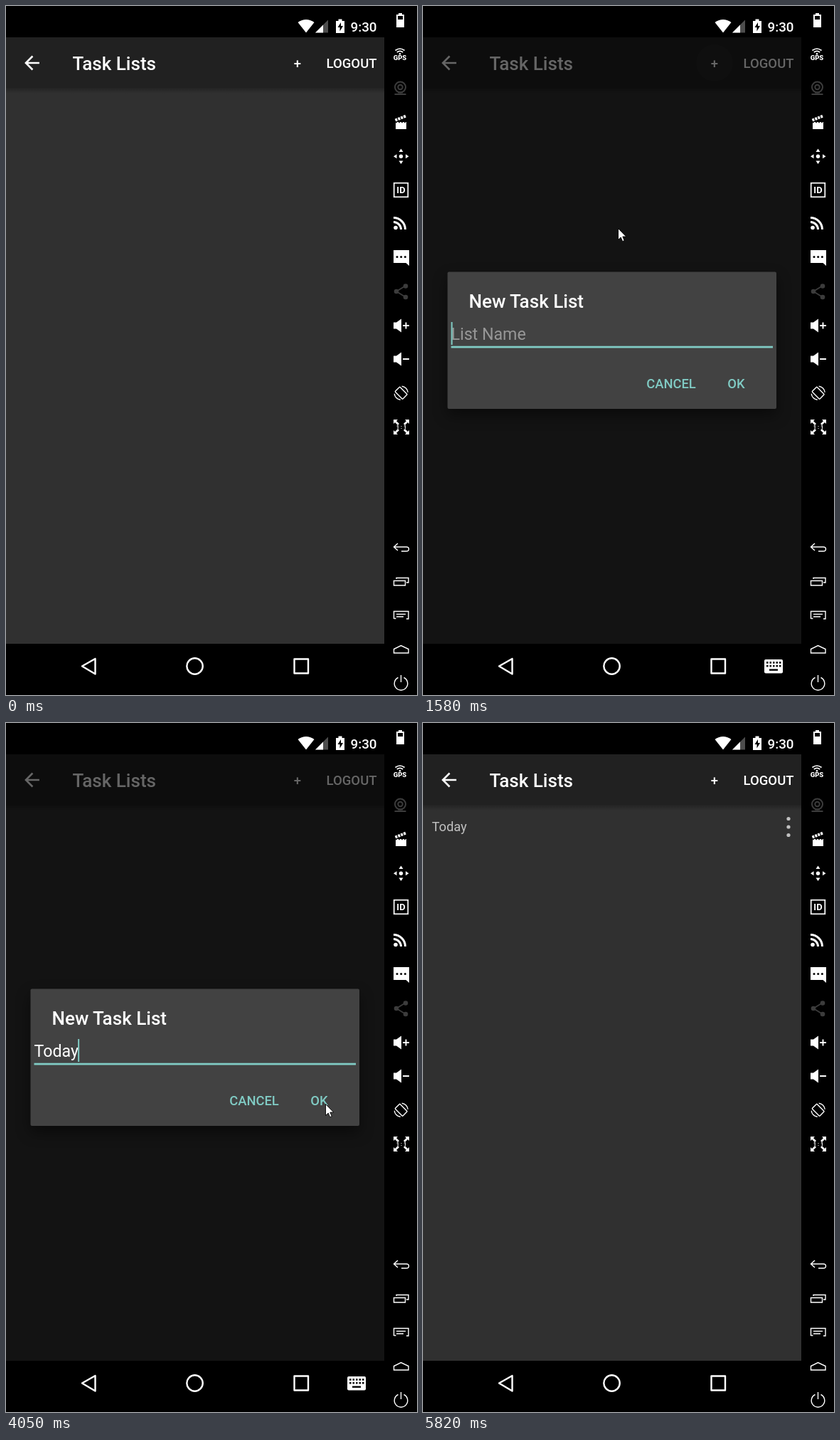
Write an HTML page that moves like this. It is 578 px wide and 968 px high and loops after 7.11 s.

```html
<!DOCTYPE html>
<html lang="en">
<head>
<meta charset="utf-8">
<title>Task Lists</title>
<style>
  html, body { margin: 0; width: 100%; height: 100%; overflow: hidden; background: #000; }
  svg { display: block; }
  text { font: 500 18.4px Roboto, sans-serif; fill: #fff; white-space: pre; }
  .title { font-size: 26px; }
  .mid { text-anchor: middle; }
  .line { fill: none; stroke: #fff; }
  .teal { fill: #80cbc4; }
  #field { font-size: 23.2px; font-weight: 400; }
  #panel { fill: #424242; filter: drop-shadow(0 9px 10px rgba(0, 0, 0, .45)); }
</style>
</head>
<body>
<svg width="578" height="968" fill="#fff">
  <defs>
    <linearGradient id="fade" x2="0" y2="1">
      <stop stop-opacity=".26"/><stop offset="1" stop-opacity="0"/>
    </linearGradient>
    <path id="speaker" d="M545 -5h4l7 -5v19l-7 -5h-4z"/>
    <path id="corner" d="M0 0h6l-2 2 4 4-2 2-4-4-2 2z"/>
    <clipPath id="screen"><path d="M0 44h532v852H0z"/></clipPath>
  </defs>
  <rect width="578" height="968" fill="#000"/>

  <!-- app -->
  <g clip-path="url(#screen)">
    <rect y="44" width="532" height="852" fill="#303030"/>
    <rect y="44" width="532" height="71" fill="#212121"/>
    <rect y="115" width="532" height="8" fill="url(#fade)"/>
    <circle id="ripple" cx="410" cy="80" r="25.7"/>
    <path transform="translate(20.9 64.4) scale(1.3)" d="M20 11H7.83l5.59-5.59L12 4l-8 8 8 8 1.41-1.41L7.83 13H20z"/>
    <text class="title" x="93.5" y="90">Task Lists</text>
    <text class="mid" x="410" y="86.5">+</text>
    <text class="mid" x="486" y="86.5" style="font-size:18.5px">LOGOUT</text>
    <g id="item" fill="#c1c1c1">
      <text x="12.6" y="152" style="font-size:18.2px;font-weight:400;fill:#c1c1c1">Today</text>
      <circle cx="514" cy="134.5" r="2.6"/><circle cx="514" cy="146" r="2.6"/><circle cx="514" cy="157.5" r="2.6"/>
    </g>
    <rect id="dim" y="44" width="532" height="852" fill="#000"/>
    <g id="dialog">
      <rect id="panel" x="34.5" y="373.5" width="462.5" height="192.5" rx="2"/>
      <text class="title" x="64.5" y="424">New Task List</text>
      <text id="field" x="39.5" y="469"></text>
      <rect id="caret" class="teal" y="444" width="2" height="32"/>
      <rect class="teal" x="39.5" y="477.7" width="452.5" height="2.8"/>
      <text class="mid teal" x="349" y="537">CANCEL</text>
      <text class="mid teal" x="440.5" y="537">OK</text>
    </g>
  </g>

  <!-- status bar -->
  <path d="M410.5 23Q422 15 433.5 23L422 37.5z"/>
  <path d="M453 19.5v18h-18z" fill="#4d4d4d"/>
  <path d="M446 26.5v11h-11z"/>
  <path d="M464 21h3.5v-2.5h5V21h3.5v17h-12z"/>
  <path d="M471 23l-4.5 7h3v5.5l4.5-7.5h-3z" fill="#000"/>
  <text x="484.5" y="35.5" style="font-size:18.8px">9:30</text>

  <!-- navigation bar -->
  <g class="line" stroke-width="2.4" stroke-linejoin="round">
    <path d="M107 927.5L125.5 917v21.5z"/>
    <circle cx="265.5" cy="927.5" r="11.2"/>
    <rect x="405.5" y="917.5" width="19.5" height="20"/>
  </g>
  <g id="keys">
    <rect x="480" y="918" width="26" height="19.5" rx="2"/>
    <path d="M483 922.5h20.5M483 927.2h20.5" stroke="#000" stroke-width="2.4" stroke-dasharray="2.5 2"/>
    <path d="M487 932.7h12" stroke="#000" stroke-width="2.4"/>
  </g>

  <!-- emulator tools -->
  <path d="M552 10h5v2h3v18h-11V12h3z"/>
  <path d="M551 14h7v5h-7z" fill="#000"/>
  <text class="mid" x="554" y="76" style="font-size:9.5px;font-weight:900">GPS</text>
  <g class="line" stroke-width="1.7">
    <path d="M547.5 62.5q6.5-5 13 0M549.8 65q4.2-3.2 8.4 0"/>
  </g>
  <circle cx="554" cy="67.2" r="1.3"/>
  <g fill="none" stroke="#3c3c3c" stroke-width="2">
    <circle cx="554.5" cy="114" r="7.5"/>
    <circle cx="554.5" cy="114" r="3.2"/>
    <path d="M546.5 124h16M551 121.5h7"/>
    <path d="M562 393l-13 8 13 8" stroke-width="1.8"/>
  </g>
  <g fill="#3c3c3c">
    <circle cx="562" cy="393.5" r="3.3"/><circle cx="549" cy="401" r="3.3"/><circle cx="562" cy="409" r="3.3"/>
  </g>
  <path d="M548 163h15v10h-15z"/>
  <path d="M547.5 160.5L562.5 154.5" stroke="#fff" stroke-width="4" stroke-dasharray="3 1.2"/>
  <path d="M548 163.7h15" stroke="#000" stroke-dasharray="2 2"/>
  <circle cx="555.5" cy="211.3" r="2.7"/>
  <path d="M555.5 200.5l3 4.5h-6zM555.5 222l3-4.5h-6zM545 211.3l4.5-3v6zM566.5 211.3l-4.5-3v6z"/>
  <rect class="line" x="545.7" y="248.7" width="19.6" height="19.6" stroke-width="1.7"/>
  <text class="mid" x="555.5" y="263.2" style="font-size:13px;font-weight:700">ID</text>
  <circle cx="548" cy="311.5" r="2.8"/>
  <path class="line" stroke-width="3" d="M545 303.5a10.5 10.5 0 0 1 10.5 10.5M545 297.5a16.5 16.5 0 0 1 16.5 16.5"/>
  <path d="M545 343h22v22l-4.5-4H545z"/>
  <g fill="#000"><circle cx="550" cy="352.5" r="1.5"/><circle cx="555.7" cy="352.5" r="1.5"/><circle cx="561.4" cy="352.5" r="1.5"/></g>
  <use href="#speaker" y="449.5"/>
  <use href="#speaker" y="496.5"/>
  <path class="line" stroke-width="1.9" d="M558 449h9M562.5 444.5v9M558 496h9"/>
  <g class="line" stroke-width="1.4" transform="translate(555.7 543.7)">
    <rect x="-4.8" y="-7.5" width="9.6" height="15" rx="1" transform="rotate(-45)"/>
    <path d="M1 -9.5A9.5 9.5 0 0 1 9.5 -1M-1 9.5A9.5 9.5 0 0 1 -9.5 1"/>
  </g>
  <use href="#corner" transform="translate(545 581)"/>
  <use href="#corner" transform="translate(567 581) scale(-1 1)"/>
  <use href="#corner" transform="translate(545 602) scale(1 -1)"/>
  <use href="#corner" transform="translate(567 602) scale(-1 -1)"/>
  <text class="mid" x="556" y="594" style="font-size:7.5px;font-weight:700">1 : 1</text>
  <g class="line" stroke-width="1.4">
    <path d="M551 755l-5.5 5 5.5 5M545.5 760h17.5q3.5 0 3.5 3t-3.5 3h-7"/>
    <path d="M545.5 807.5h16v6.5h-16zM549 805v-1.500h17v6.500h-3"/>
    <path d="M545.500 861v-10.500h20.500v10.500h-3M545.500 860.500h3M549 854.500h13M549 858h10"/>
    <path d="M545.500 909v-5.500l10-5 10.500 5v5.500z"/>
    <path d="M551.500 943.500a9.300 9.300 0 1 0 8 0M555.500 940v10"/>
  </g>

  <path id="pointer" d="M.5 .5V16.500L4.200 13 6.600 18.700 9.200 17.600 6.800 12H11.700z" stroke="#000" stroke-width=".9"/>
</svg>
<script>
const LOOP = 7110;
const el = id => document.getElementById(id);
const clamp = (v, lo, hi) => Math.min(hi, Math.max(lo, v));

// Pointer moves: start, end, number of steps, points evenly spaced in time
const moves = [
  [70, 350, 5, [[464, 887], [400, 600], [378, 320], [395, 140], [421, 61]]],
  [500, 650, 3, [[418, 66], [411, 79]]],
  [960, 960, 1, [[411, 78]]],
  [1270, 1810, 8, [[388, 108], [352, 158], [318, 215], [292, 270], [274, 312], [265, 334], [261, 341], [261, 341]]],
  [3430, 4050, 9, [[285, 360], [395, 440], [494, 520], [470, 534], [449, 535]]],
  [4810, 5440, 9, [[448, 540], [441, 575], [441, 643], [455, 780], [486, 921]]],
  [5530, 5820, 5, [[488, 925], [505, 932], [530, 940], [560, 950], [590, 980]]]
];
const typed = [[2190, 'T'], [2500, 'To'], [2650, 'Tod'], [2730, 'Toda'], [3110, 'Today']];

// Index of the screen refresh reached at time t
const stepAt = (t, start, gap) => Math.floor((t - start) / gap + .15);

function pointerAt(t) {
  const move = moves.filter(m => t >= m[0]).pop();
  if (!move) return [600, 980];
  const [start, end, n, pts] = move;
  if (n === 1) return pts[0];
  const k = clamp(stepAt(t, start, (end - start) / (n - 1)), 0, n - 1);
  const p = k / (n - 1) * (pts.length - 1);
  const i = Math.min(Math.floor(p), pts.length - 2);
  return pts[i].map((v, j) => v + (pts[i + 1][j] - v) * (p - i));
}

function draw(t) {
  const opening = stepAt(t, 1270, 77), closing = stepAt(t, 4280, 75);
  const opened = t >= 1270, closed = t >= 4280;
  let dim = 0, alpha = 0;
  if (closed) {
    dim = Math.max(0, .375 - .19 * closing);
    alpha = closing < 1 ? .18 : 0;
  } else if (opened) {
    dim = Math.min(.6, .03 + .15 * opening);
    alpha = Math.min(1, .34 * (opening + 1));
  }
  el('dim').style.opacity = dim;
  el('dialog').style.opacity = alpha;
  el('ripple').style.opacity = opened ? .09 * clamp(1 - (opening - 1) / 4, 0, 1) : 0;
  el('item').style.opacity = closed ? 1 : 0;
  el('keys').style.opacity = opened && !closed ? 1 : 0;

  const entry = typed.filter(e => t >= e[0]).pop();
  const field = el('field');
  field.textContent = entry ? entry[1] : 'List Name';
  field.style.fillOpacity = entry ? 1 : .45;
  el('caret').setAttribute('x', 39.5 + (entry ? field.getComputedTextLength() - .8 : 0));
  el('caret').style.opacity = t >= 3610 && t < 4030 ? 0 : 1;

  el('pointer').setAttribute('transform', `translate(${pointerAt(t)})`);
}

function tick() {
  draw(performance.now() % LOOP);
  requestAnimationFrame(tick);
}
tick();
</script>
</body>
</html>
```
